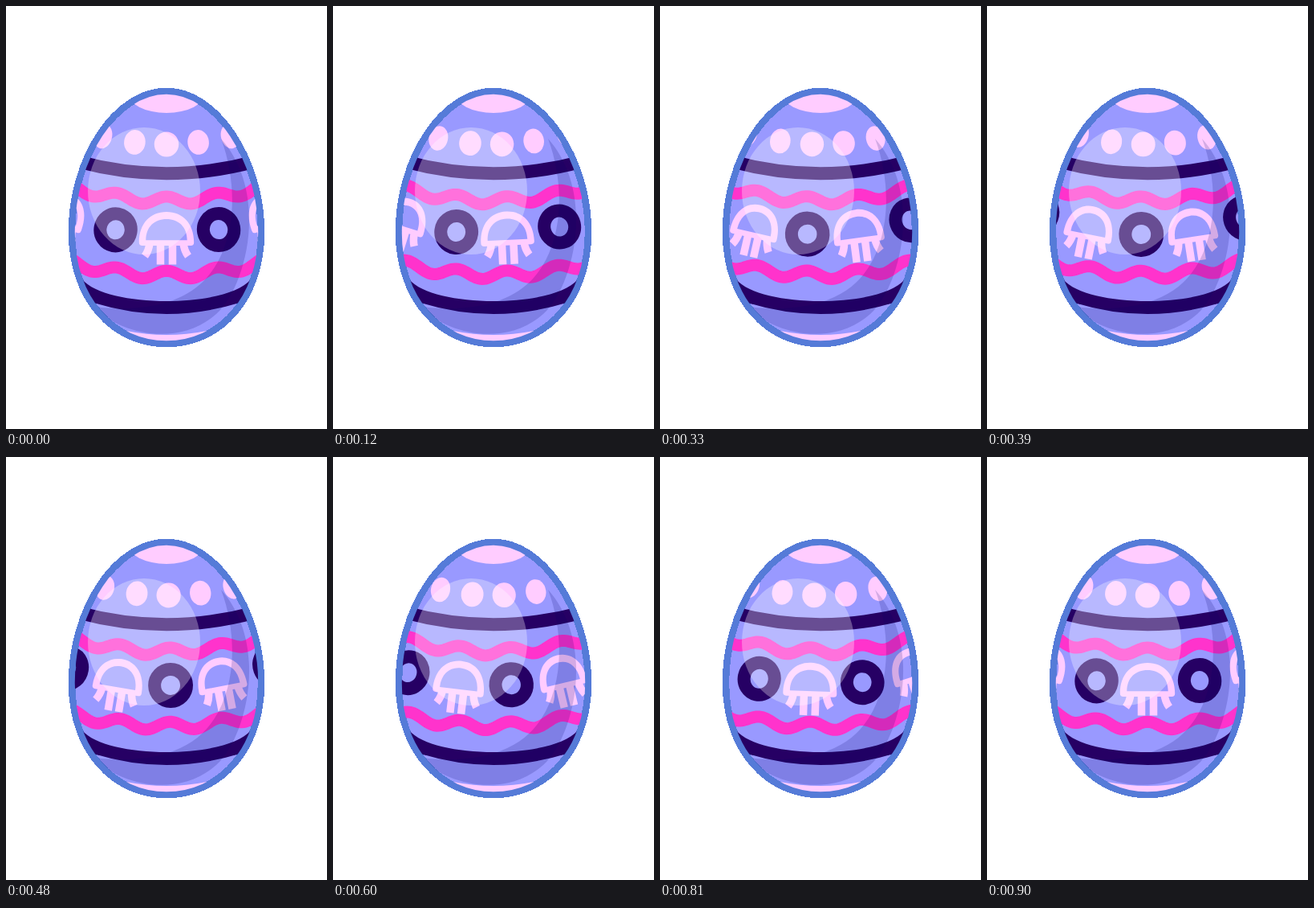
These frames come from a looping animation (400 by 526 pixels, 0.93 s). An HTML page:

```html
<!DOCTYPE html>
<html lang="en">
<head>
<meta charset="utf-8">
<title>Turning egg</title>
<style>
  html, body { margin: 0; width: 100%; height: 100%; overflow: hidden; background: #fff; }
  svg { display: block; width: 100%; height: 100%; }
</style>
</head>
<body>
<svg viewBox="0 0 400 526">
  <defs>
    <path id="egg" d="M200 106C136 106 82 190 82 281C82 365 134 420 200 420C266 420 318 365 318 281C318 192 263 106 200 106Z"/>
    <clipPath id="inside"><use href="#egg"/></clipPath>
  </defs>
  <use href="#egg" fill="#9999ff" stroke="#557bd8" stroke-width="8.5" shape-rendering="crispEdges"/>
  <g clip-path="url(#inside)">
    <ellipse cx="200" cy="108" rx="48" ry="25" fill="#ffccff"/>
    <path d="M150 404Q200 414 250 404V425H150Z" fill="#ffccff"/>
    <path d="M90 193.5Q200 223 310 193.5" fill="none" stroke="#260064" stroke-width="16"/>
    <path d="M95 340C125 376 275 376 305 340L330 369H291Q200 397 109 369H70Z" fill="#260064"/>
    <g id="waves" fill="none" stroke="#ff33cc"></g>
    <g id="dots" fill="#ffccff"></g>
    <g id="rings" fill="none" stroke="#260064" stroke-width="16"></g>
    <g id="jellies"></g>
    <path d="M268 165C292 230 284 300 250 338C225 366 180 382 110 374C140 408 215 425 262 383C298 352 330 235 268 165Z" fill="#000066" opacity=".17"/>
    <ellipse cx="172" cy="230" rx="70" ry="79" fill="#fff" opacity=".3"/>
  </g>
  <use href="#egg" fill="none" stroke="#557bd8" stroke-width="7.5"/>
</svg>
<script>
const NS = 'http://www.w3.org/2000/svg';
const MID = 200, STEP = 30, STEPS = 31;
const BELT = { y: 284, k: 0.0014, gap: 128.5 };
const DOTS = { y: 172, k: 0.0016, gap: 39.6 };
const WAVES = [
  { y: 242, k: 0.0012, amp: 5, width: 15, len: 62 },
  { y: 334.5, k: 0.0011, amp: 5.2, width: 15, len: 62 }
];

function add(id, tag, attrs = {}) {
  const el = document.createElementNS(NS, tag);
  for (const name in attrs) el.setAttribute(name, attrs[name]);
  document.getElementById(id).appendChild(el);
  return el;
}

function fill(count, id, tag, attrs) {
  return Array.from({ length: count }, () => add(id, tag, attrs));
}

const dots = fill(9, 'dots', 'ellipse', { ry: 15.4 });
const rings = fill(4, 'rings', 'ellipse', { ry: 20 });
const domes = fill(4, 'jellies', 'path', { fill: '#ffccff', 'fill-rule': 'evenodd' });
const legs = fill(4, 'jellies', 'path', { fill: 'none', stroke: '#ffccff', 'stroke-width': 9.5 });
const waves = WAVES.map(w => add('waves', 'path', { 'stroke-width': w.width }));

// Put a shape on a curved belt, d pixels from the middle, turned along the slope
function place(el, belt, d) {
  const turn = -Math.atan(2 * belt.k * d) * 180 / Math.PI;
  el.setAttribute('transform', `translate(${MID + d} ${belt.y - belt.k * d * d}) rotate(${turn})`);
}

// Half dome with the given half width, top and floor
function arch(a, top, floor) {
  const b = a * 0.58, mid = top * 0.5;
  return `M${-a} ${floor}C${-a} ${mid} ${-b} ${top} 0 ${top}S${a} ${mid} ${a} ${floor}`;
}

function domePath(s) {
  const a = 30 * s + 4.2;
  return `${arch(a, -28, 10)}Q${a} 14 ${a - 4} 14H${4 - a}Q${-a} 14 ${-a} 10Z` +
    `${arch(30 * s - 4.3, -19, 7.3)}Z`;
}

function legPath(s) {
  return [-1, 1].map(side => {
    const x = n => side * n * s;
    return `M${x(7.5)} 11V37.5M${x(21)} 11Q${x(22)} 20 ${x(27)} 27`;
  }).join('');
}

function wavePath(w, p) {
  const pts = [];
  for (let d = -124; d <= 124; d += 2) {
    const swing = Math.cos(2 * Math.PI * (d / w.len - 2 * p));
    pts.push(`${MID + d} ${(w.y - w.k * d * d - w.amp * swing).toFixed(2)}`);
  }
  return 'M' + pts.join('L');
}

function draw(p) {
  dots.forEach((el, i) => {
    const d = (i - 5 + 2 * p) * DOTS.gap;
    el.setAttribute('rx', (30.5 - 0.1 * Math.abs(d)) / 2);
    place(el, DOTS, d);
  });
  rings.forEach((el, i) => {
    const d = (i - 1.5 + p) * BELT.gap + 0.8;
    el.setAttribute('rx', 20 - 0.013 * Math.abs(d));
    place(el, BELT, d);
  });
  domes.forEach((el, i) => {
    const d = (i - 2 + p) * BELT.gap;
    const s = 1 - 0.0018 * Math.abs(d);
    el.setAttribute('d', domePath(s));
    legs[i].setAttribute('d', legPath(s));
    place(el, BELT, d);
    place(legs[i], BELT, d);
  });
  waves.forEach((el, i) => el.setAttribute('d', wavePath(WAVES[i], p)));
}

const start = performance.now();
function tick() {
  const step = Math.floor((performance.now() - start) / STEP) % STEPS;
  draw(step / (STEPS - 1));
  requestAnimationFrame(tick);
}
tick();
</script>
</body>
</html>
```
